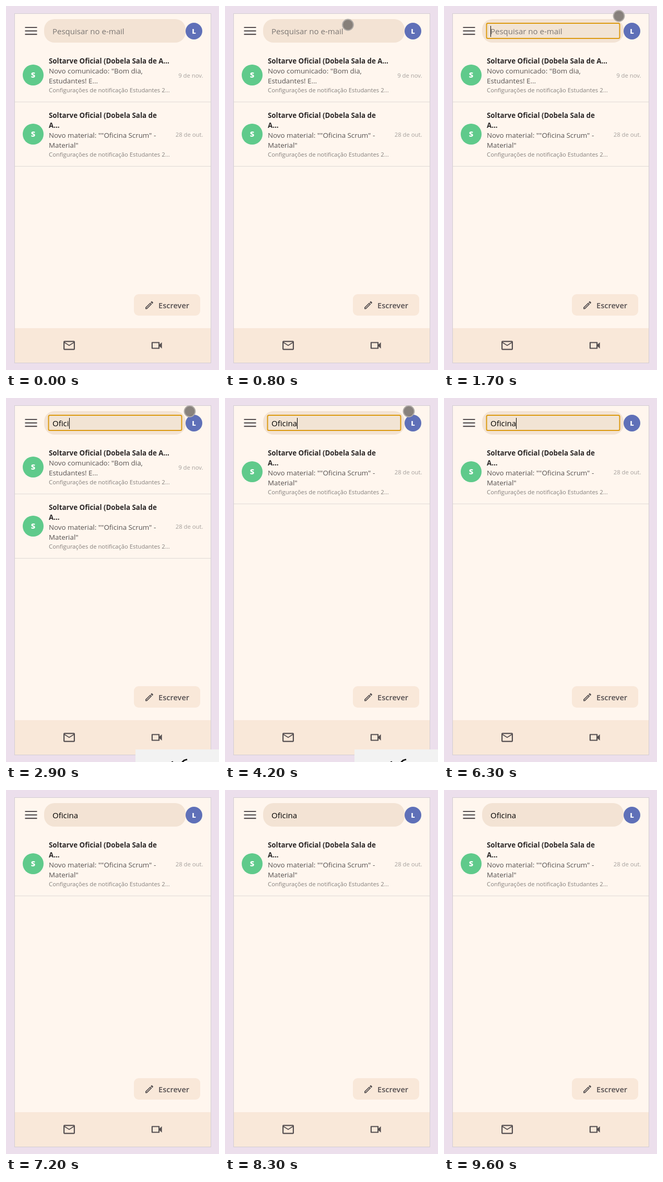
An HTML page for the animation above (9.7 s loop, 408 px wide and 696 px high).

```html
<!DOCTYPE html>
<html lang="pt-BR">
<head>
<meta charset="utf-8">
<title>Busca no e-mail</title>
<style>
html, body { margin: 0; width: 100%; height: 100%; overflow: hidden; background: #ecdfec; }
svg { display: block; width: 408px; height: 696px; font-family: "Open Sans", "Noto Sans", sans-serif; }
text { white-space: pre; }
.title { font-size: 13.35px; font-weight: 700; fill: #2b2727; }
.line { font-size: 13.35px; fill: #565150; }
.note { font-size: 11.3px; fill: #85807d; }
.date { font-size: 11.3px; fill: #a5a09c; text-anchor: end; }
.initial { font-weight: 800; fill: #fff; text-anchor: middle; }
.field { font-size: 15px; }
.icon { fill: #544e50; }
.rule { fill: #dfdad6; }
.soft { fill: #f9e8d9; }
</style>
</head>
<body>
<svg viewBox="0 0 408 696">
  <rect width="408" height="696" fill="#ecdfec"/>
  <rect x="16.5" y="14.5" width="376" height="668" fill="#fff6ee" stroke="#d3cdd2"/>

  <path class="icon" transform="translate(32.600 32.200) scale(1.280)" d="M3 18h18v-1.700H3zm0-5.150h18v-1.700H3zM3 6v1.700h18V6z"/>
  <rect x="73" y="25" width="271" height="45" rx="20" fill="#f3e3d4"/>
  <rect id="ring" x="81.500" y="33" width="255" height="29" rx="2.500" fill="#f2e4d4" stroke="#dc9a10" stroke-width="2"/>
  <text id="hint" class="field" x="89" y="54" fill="#7b7673">Pesquisar no e-mail</text>
  <text id="query" class="field" x="89" y="54"></text>
  <rect id="caret" y="38" width="1" height="21"/>
  <circle cx="360" cy="48" r="16" fill="#5f70b8"/>
  <text class="initial" x="360" y="52.500" font-size="13">L</text>

  <g id="first">
    <circle cx="52" cy="132" r="20" fill="#5fca8b"/>
    <text class="initial" x="52" y="137" font-size="14.500">S</text>
    <text class="title" x="82" y="110">Soltarve Oficial (Dobela Sala de A...</text>
    <text class="line" x="82" y="129">Novo comunicado: "Bom dia,</text>
    <text class="line" x="82" y="148">Estudantes! E...</text>
    <text class="note" x="82" y="165">Configurações de notificação Estudantes 2...</text>
    <text class="date" x="377.500" y="137">9 de nov.</text>
    <rect class="rule" x="17" y="183" width="375" height="1"/>
  </g>
  <g id="second">
    <circle cx="52" cy="245" r="20" fill="#5fca8b"/>
    <text class="initial" x="52" y="250" font-size="14.500">S</text>
    <text class="title" x="82" y="214">Soltarve Oficial (Dobela Sala de</text>
    <text class="title" x="82" y="233">A...</text>
    <text class="line" x="82" y="252">Novo material: ""Oficina Scrum" -</text>
    <text class="line" x="82" y="271">Material"</text>
    <text class="note" x="82" y="288">Configurações de notificação Estudantes 2...</text>
    <text class="date" x="377.500" y="250">28 de out.</text>
    <rect class="rule" x="17" y="306" width="375" height="1"/>
  </g>

  <rect class="soft" x="245" y="551" width="127" height="41" rx="9"/>
  <path class="icon" transform="translate(264.500 562) scale(.833)" d="M3 17.250V21h3.750L17.810 9.940l-3.750-3.750zM5.920 19H5v-.920l9.060-9.060.920.920zM20.710 5.630l-2.340-2.340a1 1 0 0 0-1.410 0l-1.830 1.830 3.750 3.750 1.830-1.830a1 1 0 0 0 0-1.410z"/>
  <text class="icon" x="292" y="578" font-size="14.600" font-weight="600">Escrever</text>

  <rect class="soft" x="17" y="616" width="375" height="66"/>
  <path class="icon" transform="translate(107.800 635.800) scale(1.100)" d="M20 4H4a2 2 0 0 0-2 2v12a2 2 0 0 0 2 2h16a2 2 0 0 0 2-2V6a2 2 0 0 0-2-2zm0 14H4V8l8 5 8-5zm-8-7L4 6h16z"/>
  <path class="icon" transform="translate(275.500 635.800) scale(1.100)" d="M15 8v8H5V8h10m1-2H4a1 1 0 0 0-1 1v10a1 1 0 0 0 1 1h12a1 1 0 0 0 1-1v-3.500l4 4v-11l-4 4V7a1 1 0 0 0-1-1z"/>

  <g id="popup">
    <rect x="248" y="672" width="160" height="24" fill="#f2f2f2"/>
    <path d="M337 697l4-4 6-2M317 697l3-1.500" fill="none" stroke="#111" stroke-width="2.800"/>
  </g>
  <circle id="pointer" r="10.400" fill="#77726d" fill-opacity=".88" stroke="#b0aba7" stroke-width="2"/>
</svg>
<script>
const LOOP = 9700, STEP = 100, BLINK = 500;
const FOCUS = 1300, BLUR = 6700, FILTER = 3000;
const WORD = "Oficina", KEYS = [2200, 2300, 2500, 2600, 2800, 3000, 3200];
const PATH = [[500, 258, 58], [800, 235.5, 36], [1300, 235.5, 36], [1700, 335, 19], [2000, 352, 25.5]];
const $ = id => document.getElementById(id);
const show = (id, on) => $(id).setAttribute("visibility", on ? "visible" : "hidden");

function pointerAt(t) {
  const i = PATH.findIndex(p => p[0] > t);
  if (i < 0) return PATH[PATH.length - 1].slice(1);
  if (i === 0) return PATH[0].slice(1);
  const [t0, x0, y0] = PATH[i - 1], [t1, x1, y1] = PATH[i];
  const k = (t - t0) / (t1 - t0);
  return [x0 + (x1 - x0) * k, y0 + (y1 - y0) * k];
}

function draw(t) {
  const typed = KEYS.filter(k => k <= t).length;
  const focused = t >= FOCUS && t < BLUR;
  const query = $("query");
  query.textContent = WORD.slice(0, typed);
  show("hint", !typed);
  show("ring", focused);

  const since = t - (typed ? KEYS[typed - 1] : FOCUS);
  show("caret", focused && Math.floor(since / BLINK) % 2 === 0);
  $("caret").setAttribute("x", typed ? Math.round(89 + query.getComputedTextLength()) : 89);

  show("first", t < FILTER);
  $("second").setAttribute("transform", `translate(0 ${t < FILTER ? 0 : -104})`);
  show("popup", t >= 2500 && t < 4700);

  const [x, y] = pointerAt(t);
  $("pointer").setAttribute("transform", `translate(${x} ${y})`);
  show("pointer", t >= PATH[0][0] && t < 4800);
}

const start = performance.now();
function tick() {
  const t = (performance.now() - start) % LOOP;
  draw(Math.floor(t / STEP) * STEP);
  requestAnimationFrame(tick);
}
tick();
</script>
</body>
</html>
```
